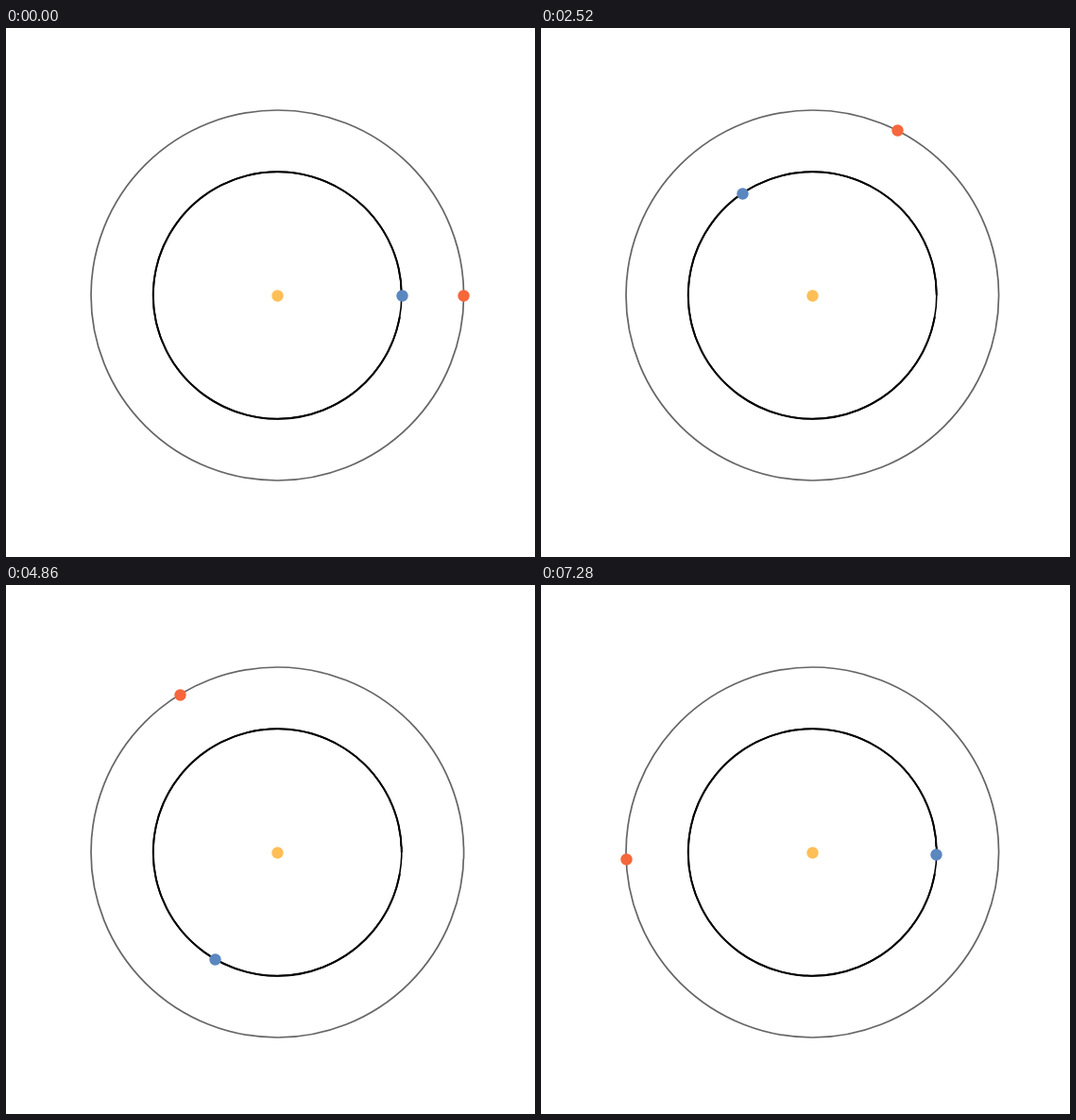
Animation, 560 px wide and 560 px high, one loop 7300 ms. Source, as an HTML page:

```html
<!DOCTYPE html>
<html lang="en">
<head>
<meta charset="utf-8">
<title>Two orbits</title>
<style>
  html, body { margin: 0; width: 100%; height: 100%; overflow: hidden; background: #fff; }
  svg { display: block; width: 560px; height: 560px; }
  ellipse, path { fill: none; }
</style>
</head>
<body>
<svg viewBox="0 0 560 560">
  <g transform="translate(.3 .3)">
    <ellipse cx="287" cy="282.7" rx="197.3" ry="196" stroke="#666" stroke-width="1.7"/>
    <ellipse cx="287" cy="282.7" rx="131.5" ry="130.7" stroke="#000" stroke-width="1.6"/>
    <!-- the inner line is a little heavier, except just below its start -->
    <path d="M418.5 282.7A131.5 130.7 0 1 0 416.5 305.4" stroke="#000" stroke-width="2"/>
  </g>
  <circle id="sun" r="6.2" fill="#ffbf57"/>
  <circle id="inner" r="6.2" fill="#5b87c0"/>
  <circle id="outer" r="6.2" fill="#f6673b"/>
</svg>
<script>
  const LOOP = 7300, STEP = 20;
  const CENTER = { x: 287, y: 282.7 };
  const bodies = [
    { id: 'sun', rx: 0, ry: 0, turn: 0 },
    { id: 'inner', rx: 131.5, ry: 130.7, turn: 360 / 365 },
    { id: 'outer', rx: 197.3, ry: 196, turn: 0.5 }
  ].map(b => ({ ...b, el: document.getElementById(b.id) }));

  // Dots sit on whole pixels.
  const snap = v => Math.round(v) + 0.5;

  function draw(ms) {
    const day = Math.floor((ms % LOOP) / STEP);
    for (const { el, rx, ry, turn } of bodies) {
      const a = day * turn * Math.PI / 180;
      el.setAttribute('cx', snap(CENTER.x + rx * Math.cos(a)));
      el.setAttribute('cy', snap(CENTER.y - ry * Math.sin(a)));
    }
  }

  const start = performance.now();
  function tick() {
    draw(performance.now() - start);
    requestAnimationFrame(tick);
  }
  draw(0);
  requestAnimationFrame(tick);
</script>
</body>
</html>
```
